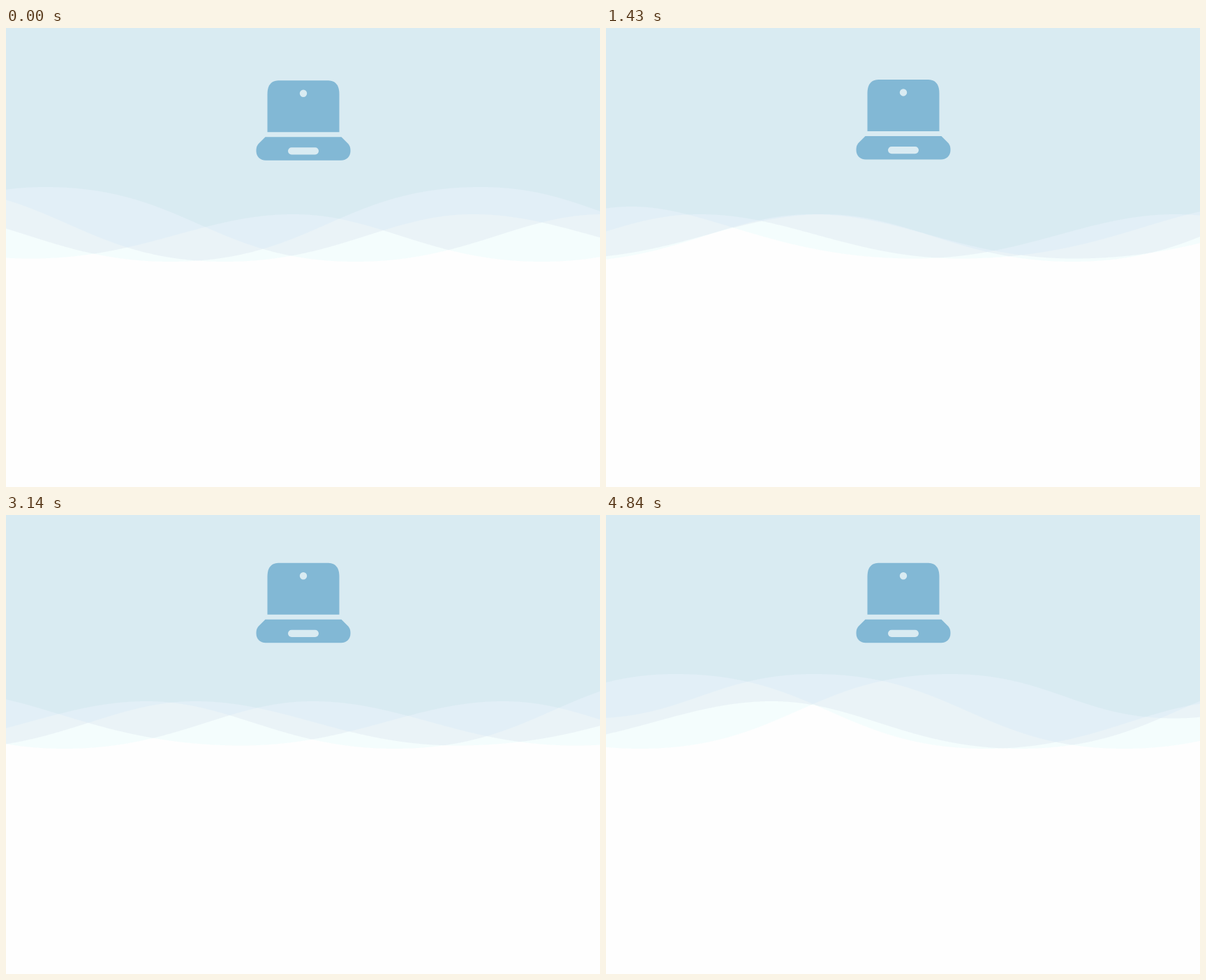
These frames come from a looping animation (851 by 658 pixels, 4.96 s). An HTML page with a canvas:

```html
<!DOCTYPE html>
<html lang="en">
<head>
<meta charset="utf-8">
<title>Laptop over waves</title>
<style>
  html, body { margin: 0; width: 100%; height: 100%; overflow: hidden; background: #fefefe; }
  canvas { display: block; }
</style>
</head>
<body>
<canvas id="stage" width="851" height="658"></canvas>
<script>
const W = 851, H = 658, LOOP = 4960, STEP = 71.2, LAST_STEP = 68;
const SKY = '#d9ebf2', BLUE = '#82b8d5';
const LAYERS = ['#e2eff7', '#eaf3f7', '#f4fdfd', '#fefefe'];
const ctx = document.getElementById('stage').getContext('2d');

// Crests and troughs of the swell: x, y, handle length before and after
const SWELL = [
  [0, 256, 0, .27],
  [405, 330.5, .49, .42],
  [780, 267, .34, .34],
  [1135, 335, .45, .46],
  [1580, 228, .45, .44],
  [1900, 291.5, .42, 0]
];
const SWELL_END = 1900;

// Waves: start of the swell, speed in px/s, direction it faces
const WAVES = [
  { start: 1636, speed: -394, facing: -1 },
  { start: 1449, speed: -376, facing: -1 },
  { start: -368, speed: 284, facing: 1 },
  { start: -900, speed: 304, facing: 1 }
];
const TURN = 2.158;

const cubic = (a, b, c, d, t) => {
  const s = 1 - t;
  return s * s * s * a + 3 * s * s * t * b + 3 * s * t * t * c + t * t * t * d;
};

function sampleSwell() {
  const heights = [];
  for (let i = 1; i < SWELL.length; i++) {
    const [x0, y0, , out] = SWELL[i - 1];
    const [x1, y1, into] = SWELL[i];
    for (let x = x0; x <= x1; x++) {
      const goal = (x - x0) / (x1 - x0);
      let lo = 0, hi = 1;
      for (let k = 0; k < 20; k++) {
        const mid = (lo + hi) / 2;
        if (cubic(0, out, 1 - into, 1, mid) < goal) lo = mid; else hi = mid;
      }
      heights[x] = cubic(y0, y0, y1, y1, lo);
    }
  }
  return heights;
}
const heights = sampleSwell();

function swellAt(u) {
  u = Math.abs(u);
  if (u > SWELL_END) u = 2 * SWELL_END - u;
  const i = Math.min(Math.floor(u), SWELL_END - 1);
  return heights[i] + (heights[i + 1] - heights[i]) * (u - i);
}

// The waves drift one way, then turn back and slow down a little
function drift(sec) {
  const back = Math.max(0, sec - TURN);
  return Math.min(sec, TURN) - 1.183 * back + .056 * back * back;
}

function drawWaves(sec) {
  const columns = [];
  for (let x = 0; x <= W; x++) {
    columns.push(WAVES
      .map(w => swellAt(w.facing * (x - w.start - w.speed * drift(sec))))
      .sort((a, b) => a - b));
  }
  LAYERS.forEach((color, rank) => {
    ctx.fillStyle = color;
    ctx.beginPath();
    ctx.moveTo(0, H);
    columns.forEach((ys, x) => ctx.lineTo(x, ys[rank]));
    ctx.lineTo(W, H);
    ctx.fill();
  });
}

function bob(ms) {
  const period = 2160, rise = 1120, low = 740;
  const p = (ms - low + period) % period;
  return 66 + 13 * (p < rise ? p / rise : (period - p) / (period - rise));
}

const lid = new Path2D('M374.5 74V20C374.5 5 381 0 392 0H460C471 0 477.5 5 477.5 20V74Z');
const base = new Path2D('M371.5 81H480.5L489.5 90C493 93.5 493.5 97 493.5 101' +
  'C493.5 109 488 114.5 480 114.5H372C364 114.5 358.5 109 358.5 101C358.5 97 359 93.5 362.5 90Z');
const holes = new Path2D();
holes.arc(426, 18.5, 5.2, 0, 7);
holes.roundRect(404, 96, 44, 10.2, 5.1);

function drawLaptop(y) {
  ctx.save();
  ctx.translate(0, y);
  ctx.fillStyle = BLUE;
  ctx.fill(lid);
  ctx.fill(base);
  ctx.fillStyle = SKY;
  ctx.fill(holes);
  ctx.restore();
}

function draw(now) {
  const step = Math.min(LAST_STEP, Math.floor((now % LOOP + 1.5) / STEP));
  const ms = step * STEP;
  ctx.fillStyle = SKY;
  ctx.fillRect(0, 0, W, H);
  drawWaves(ms / 1000);
  drawLaptop(bob(ms));
}

const begin = performance.now();
function tick() {
  draw(performance.now() - begin);
  requestAnimationFrame(tick);
}
tick();
</script>
</body>
</html>
```
